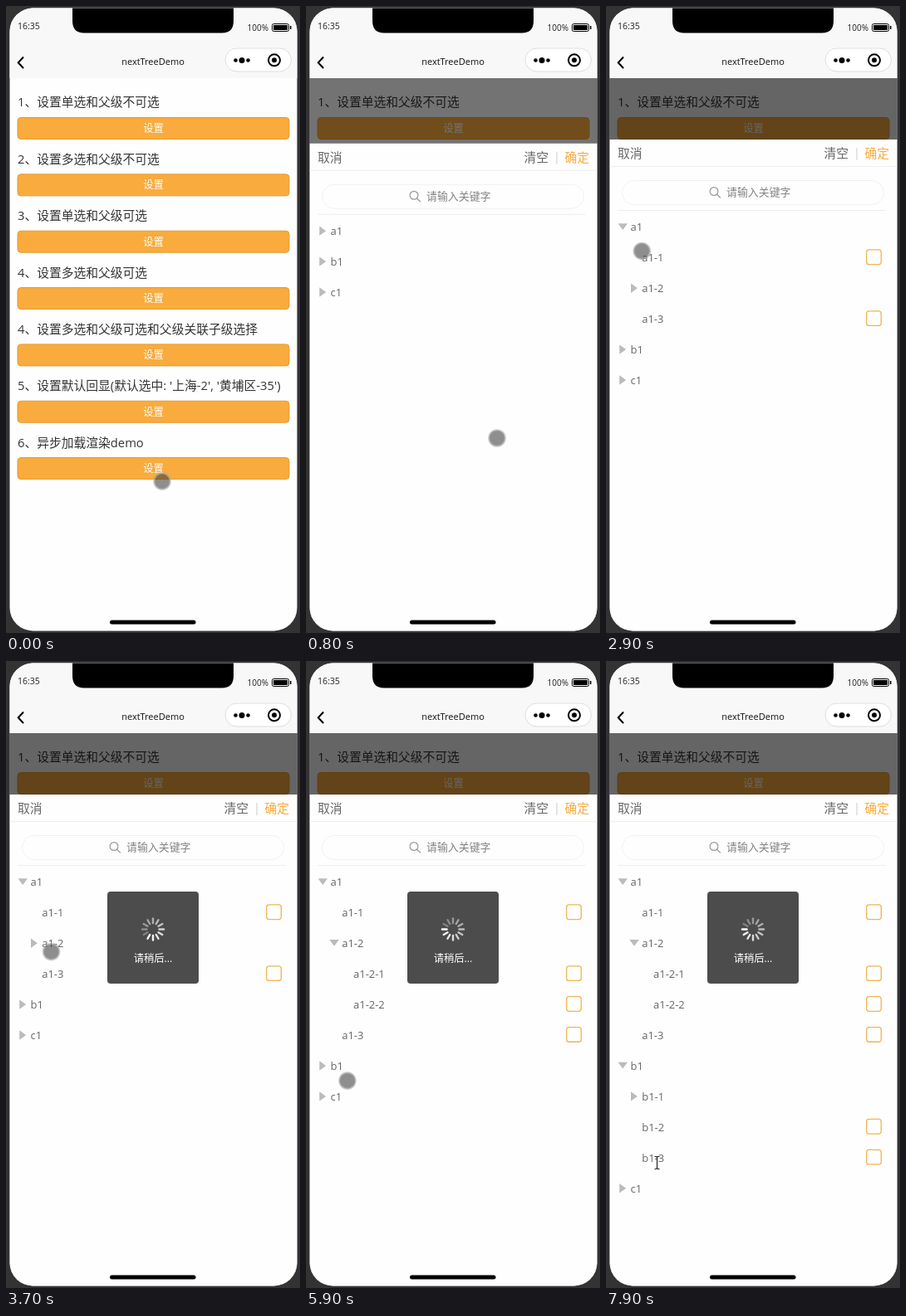
Recreate the animation shown at these times as an HTML page. Size 354x756 px, loop 8000 ms.

```html
<!DOCTYPE html>
<html lang="zh-CN">
<head>
<meta charset="utf-8">
<title>nextTreeDemo</title>
<style>
  html, body { margin: 0; width: 100%; height: 100%; overflow: hidden; background: #333; }
  svg { display: block; width: 354px; height: 756px; }
  text { font-family: "Open Sans", "Noto Sans CJK SC", "Noto Sans CJK", sans-serif; }
</style>
</head>
<body>
<svg id="stage" viewBox="0 0 354 756">
  <defs><clipPath id="screen"><rect x="4.5" y="2.5" width="346" height="751" rx="28"/></clipPath></defs>
  <g clip-path="url(#screen)">
    <rect width="354" height="756" fill="#fefefe"/>
    <g id="home"></g>
    <rect id="shade" y="87" width="354" height="669"/>
    <g id="sheet">
      <rect y="161" width="354" height="600" fill="#fefefe"/>
      <path d="M4 193.5H351M14 246.5H337" stroke="#eee"/>
      <path d="M302 171V186" stroke="#ccc"/>
      <rect x="19.5" y="210.5" width="315" height="29" rx="14.5" fill="none" stroke="#f1f1f1"/>
      <g fill="none" stroke="#999" stroke-width="1.2" stroke-linecap="round">
        <circle cx="130" cy="223.5" r="4.9"/><path d="M133.6 227.2L137.5 231"/>
      </g>
      <g id="tree"></g>
    </g>
    <g id="loader">
      <rect x="122" y="278" width="110" height="111" rx="4" fill="#4c4c4c"/>
      <g id="spinner"></g>
    </g>
    <g id="bar">
      <rect width="354" height="87" fill="#f8f8f8"/>
      <path d="M80 2H274V18Q274 32.500 260 32.500H94Q80 32.500 80 18Z"/>
      <path d="M21 61.500L14.700 68.300L21 75" fill="none" stroke="#000" stroke-width="2"/>
      <rect x="320.500" y="21.500" width="20" height="9" rx="2" fill="none" stroke="#000"/>
      <path d="M322 23H339V29H322ZM342 24H343.500V28H342Z"/>
      <rect x="264" y="51" width="79.500" height="28" rx="14" fill="#fff" stroke="#dedede"/>
      <circle cx="276.500" cy="65.500" r="2.300"/><circle cx="284" cy="65.500" r="3.500"/><circle cx="291.500" cy="65.500" r="2.300"/>
      <circle cx="323" cy="65.300" r="7" fill="none" stroke="#000" stroke-width="2"/><circle cx="323" cy="65.300" r="3"/>
    </g>
    <rect x="125" y="740.500" width="103.500" height="5" rx="2.500"/>
  </g>
  <g id="cursor">
    <circle r="9.600" fill="#3c3c3c" fill-opacity=".58" stroke="#aaa" stroke-opacity=".6" stroke-width="2.400"/>
    <path d="M0 0V15.500L3.600 12.200L6.200 18.200L8.700 17.100L6.100 11.300H10.800Z" fill="#fff" stroke="#000"/>
    <path d="M-3 -7.500H-1L0 -6.500L1 -7.500H3M-3 7.500H-1L0 6.500L1 7.500H3M0 -6.500V6.500" fill="none" stroke="#222" stroke-width="1.200"/>
  </g>
</svg>
<script>
const LOOP = 8000, STEP = 100, ROW = 36.93, ORANGE = '#f9ab3d';
const $ = id => document.getElementById(id);

function add(parent, tag, attrs, content = '') {
  const el = document.createElementNS('http://www.w3.org/2000/svg', tag);
  for (const key in attrs) el.setAttribute(key, attrs[key]);
  el.textContent = content;
  return parent.appendChild(el);
}

// y is the vertical middle of the glyphs
function label(parent, content, x, y, size, fill, anchor = 'start') {
  return add(parent, 'text', { x, y: y + size * 0.37, 'font-size': size, fill, 'text-anchor': anchor }, content);
}

label($('bar'), '16:35', 14, 24.5, 10.5, '#222');
label($('bar'), '100%', 290.5, 26.5, 10, '#222');
label($('bar'), 'nextTreeDemo', 177, 67, 11, '#111', 'middle');

[
  '1、设置单选和父级不可选', '2、设置多选和父级不可选', '3、设置单选和父级可选', '4、设置多选和父级可选',
  '4、设置多选和父级可选和父级关联子级选择', "5、设置默认回显(默认选中: '上海-2', '黄埔区-35')", '6、异步加载渲染demo'
].forEach((text, i) => {
  const y = 116 + i * 68.35;
  label($('home'), text, 14, y, 14.77, '#333');
  add($('home'), 'rect', { x: 14, y: y + 18.5, width: 327, height: 26, rx: 4, fill: ORANGE, stroke: '#e39a35' });
  label($('home'), '设置', 177.5, y + 31.5, 12.3, '#fff', 'middle');
});

label($('sheet'), '取消', 14, 178, 14.77, '#666');
label($('sheet'), '清空', 262.5, 178, 14.77, '#666');
label($('sheet'), '确定', 311.5, 178, 14.77, ORANGE);
label($('sheet'), '请输入关键字', 145, 224.5, 12.93, '#808080');
label($('loader'), '请稍后...', 177, 358.5, 12.3, '#fff', 'middle');

for (let i = 0; i < 12; i++) {
  add($('spinner'), 'path', {
    d: 'M0 -7.5V-13', stroke: '#fff', 'stroke-width': 2.4, 'stroke-linecap': 'round',
    'stroke-opacity': 0.3 + 0.7 * i / 11, transform: `rotate(${i * 30})`
  });
}

// When each branch opens
const opens = { a1: 2600, 'a1-2': 4600, b1: 6500, 'b1-1': Infinity, c1: Infinity };
const nodes = 'a1 a1-1 a1-2 a1-2-1 a1-2-2 a1-3 b1 b1-1 b1-2 b1-3 c1'.split(' ').map(name => {
  const el = add($('tree'), 'g', {});
  const depth = name.split('-').length - 1;
  const x = 29.5 + depth * 13.8;
  label(el, name, x, 0, 12.93, '#666');
  const branch = name in opens;
  const arrow = branch && add(el, 'path', { fill: '#bbb' });
  if (!branch) {
    add(el, 'rect', { x: 313.7, y: -9.7, width: 17.6, height: 17.6, rx: 3, fill: '#fff', stroke: '#f1b453', 'stroke-width': 1.3 });
  }
  return { el, name, x, arrow, from: depth ? opens[name.slice(0, -2)] : 0 };
});

// time, x, y
const path = [
  [0, 188, 573], [500, 188, 573], [800, 230, 521], [1400, 38, 270], [2600, 38, 270], [3400, 54.5, 350.5],
  [4500, 54.5, 350.5], [4900, 123, 370], [5400, 47, 488], [5600, 47, 488], [6400, 56, 545],
  [6900, 67, 551], [7300, 43.5, 525], [7500, 43.5, 525], [7900, 61.5, 605]
];
const loading = [[1700, 2600], [3700, 4600], [5600, 6500], [7500, 8000]];
const show = (el, on) => el.setAttribute('display', on ? 'inline' : 'none');

function cursorAt(t) {
  const i = path.findIndex(p => p[0] > t);
  if (i < 0) return path[path.length - 1].slice(1);
  const [a, b] = [path[i - 1], path[i]];
  const k = (t - a[0]) / (b[0] - a[0]), e = k * k * (3 - 2 * k);
  return [a[1] + (b[1] - a[1]) * e, a[2] + (b[2] - a[2]) * e];
}

function render(t) {
  const left = 1 - Math.min(1, Math.max(0, (t - 560) / 300));
  $('sheet').setAttribute('transform', `translate(0 ${595 * left ** 3})`);
  $('shade').setAttribute('opacity', 0.6 * (1 - left ** 1.5));

  let row = 0;
  for (const { el, name, x, arrow, from } of nodes) {
    const on = t >= from;
    show(el, on);
    if (!on) continue;
    el.setAttribute('transform', `translate(0 ${266.7 + ROW * row++})`);
    if (arrow) {
      arrow.setAttribute('d', t >= opens[name]
        ? `M${x - 15} -4.500h11.400l-5.700 7.700z`
        : `M${x - 13.3} -6v11.400l7.900 -5.700z`);
    }
  }

  show($('loader'), loading.some(([a, b]) => t >= a && t < b));
  $('spinner').setAttribute('transform', `translate(177 323.500) rotate(${Math.floor(t * 12 / 1000) * 30})`);

  const [x, y] = cursorAt(t);
  $('cursor').setAttribute('transform', `translate(${x} ${y})`);
  const kind = t >= 7700 ? 2 : t >= 6600 && t < 7200 ? 1 : 0;
  [...$('cursor').children].forEach((el, i) => show(el, i === kind));
}

const start = performance.now();
function tick() {
  const t = (performance.now() - start) % LOOP;
  render(Math.floor(t / STEP) * STEP);
  requestAnimationFrame(tick);
}
tick();
</script>
</body>
</html>
```
